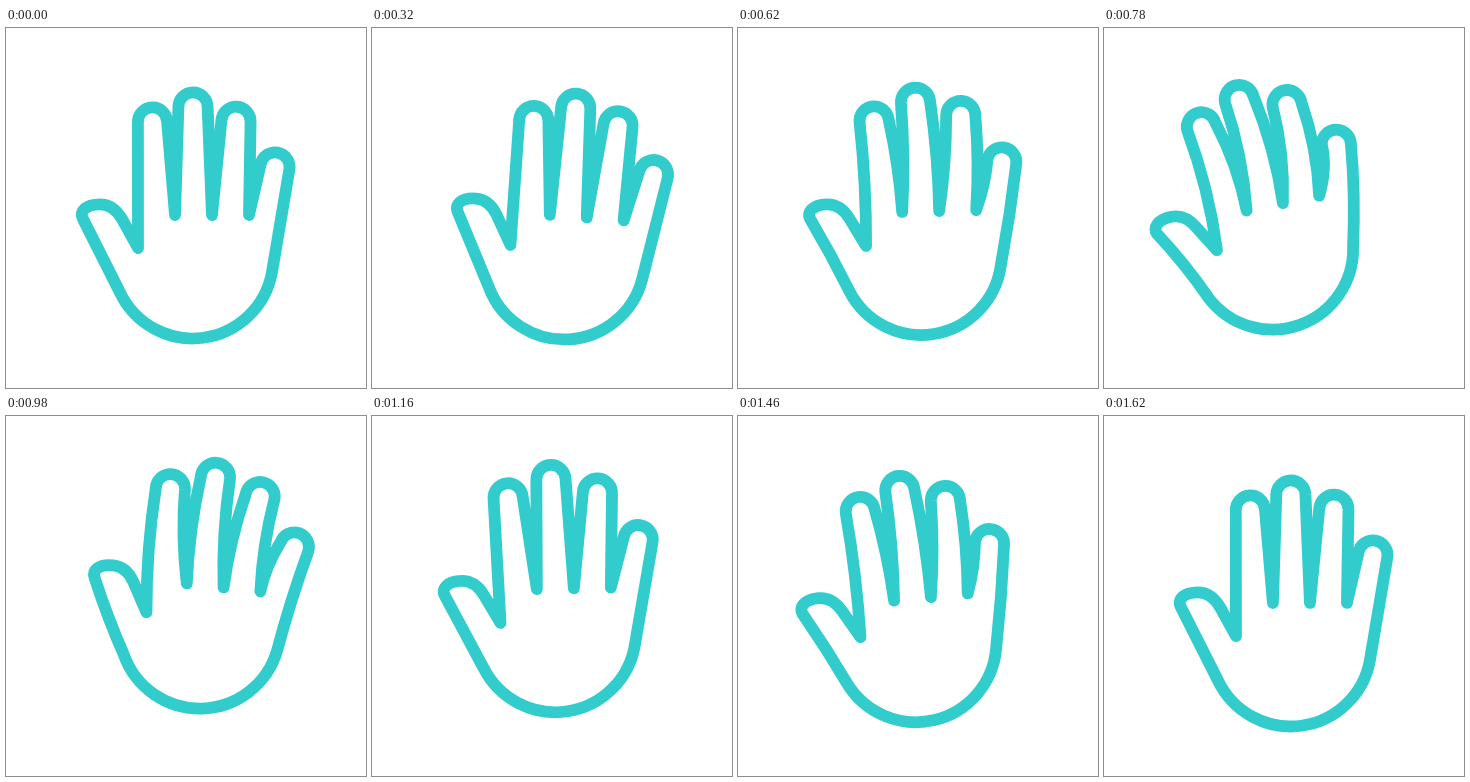
An HTML page for the animation above (1800 ms loop, 360 px wide and 360 px high).

```html
<!DOCTYPE html>
<html lang="en">
<head>
<meta charset="utf-8">
<title>Waving hand</title>
<style>
  html, body { margin: 0; width: 100%; height: 100%; overflow: hidden; background: #fff; }
  svg { display: block; width: 100%; height: 100%; }
  path { fill: none; stroke: #33cccc; stroke-width: 11.8; stroke-linejoin: round; stroke-linecap: round; }
</style>
</head>
<body>
<svg viewBox="0 0 360 360"><path id="hand"/></svg>
<script>
const LOOP = 1800;
const hand = document.getElementById('hand');

// x, y: palm centre; bow: curve of the fingers; fan: spread; arch: rise of the middle fingers
const rest  = { x: 187, y: 227, tilt: 0, bow: 0, fan: 0, arch: 0 };
const right = { x: 198.5, y: 229, tilt: 8.7, bow: 0, fan: 1, arch: 0.5 };
const left  = { x: 168, y: 218, tilt: -11.7, bow: 7, fan: 2.8, arch: 2.3 };
const high  = { x: 199.3, y: 207.5, tilt: 9.4, bow: -7, fan: 4, arch: 0.3 };
const keys = [[0, rest], [200, rest], [440, right], [800, left],
              [1040, high], [1280, left], [1630, rest], [LOOP, rest]];

// Hand at rest: centres of the fingertips and the corners between fingers
const RADIUS = 14.6, KNUCKLE = 187, LONGEST = 108;
const tips = [[146.5, 94], [187, 79], [230, 93.3], [269, 139]];
const corners = [[132, 220], [169, KNUCKLE], [206, KNUCKLE], [243, KNUCKLE], [266, 244]];

const mix = (a, b, p) => a + (b - a) * p;
const ease = u => u * u * (3 - 2 * u);

function poseAt(t) {
  const i = keys.findIndex(k => t < k[0]);
  const [t0, a] = keys[i - 1], [t1, b] = keys[i];
  const p = ease((t - t0) / (t1 - t0));
  return Object.fromEntries(Object.keys(a).map(k => [k, mix(a[k], b[k], p)]));
}

function side([ax, ay], [bx, by], bow) {
  return `Q${mix(ax, bx, 0.5) + bow} ${mix(ay, by, 0.5)} ${bx} ${by}`;
}

function finger(i, { bow, fan, arch }) {
  const [tx, ty] = tips[i], from = corners[i], to = corners[i + 1];
  const reach = (KNUCKLE - ty) / LONGEST, place = i - 1.5;
  const x = tx + (fan * place - bow / 4) * reach;
  const y = ty + arch * (place * place - 1.25) * reach;
  // the round cap sits square on the finger's axis
  const axis = Math.atan2(x - mix(from[0], to[0], 0.5), mix(from[1], to[1], 0.5) - y);
  const dx = RADIUS * Math.cos(axis), dy = RADIUS * Math.sin(axis);
  const a = [x - dx, y - dy], b = [x + dx, y + dy];
  const outer = i === tips.length - 1;
  return side(from, a, bow) + `A${RADIUS} ${RADIUS} 0 0 1 ${b}` + side(b, to, outer ? bow / 2 : bow);
}

function outline(pose) {
  const drop = y => y + pose.arch * 0.8;
  return `M${corners[0]}` + tips.map((_, i) => finger(i, pose)).join('') +
    'A80.5 80.5 0 0 1 114 264.5' + side([114, 264.5], [76.5, drop(190)], pose.bow / 2) +
    `C73.5 ${drop(184)} 79 ${drop(176.3)} 94 ${drop(176.3)}` +
    `C106 ${drop(176.3)} 112 ${drop(184)} 116 ${drop(191)}Z`;
}

function draw(now) {
  const pose = poseAt(now % LOOP);
  hand.setAttribute('d', outline(pose));
  hand.setAttribute('transform',
    `translate(${pose.x} ${pose.y}) rotate(${pose.tilt}) translate(${-rest.x} ${-rest.y})`);
}

let start;
function tick(now) {
  start ??= now;
  draw(Math.max(0, now - start));
  requestAnimationFrame(tick);
}
draw(0);
requestAnimationFrame(tick);
</script>
</body>
</html>
```
